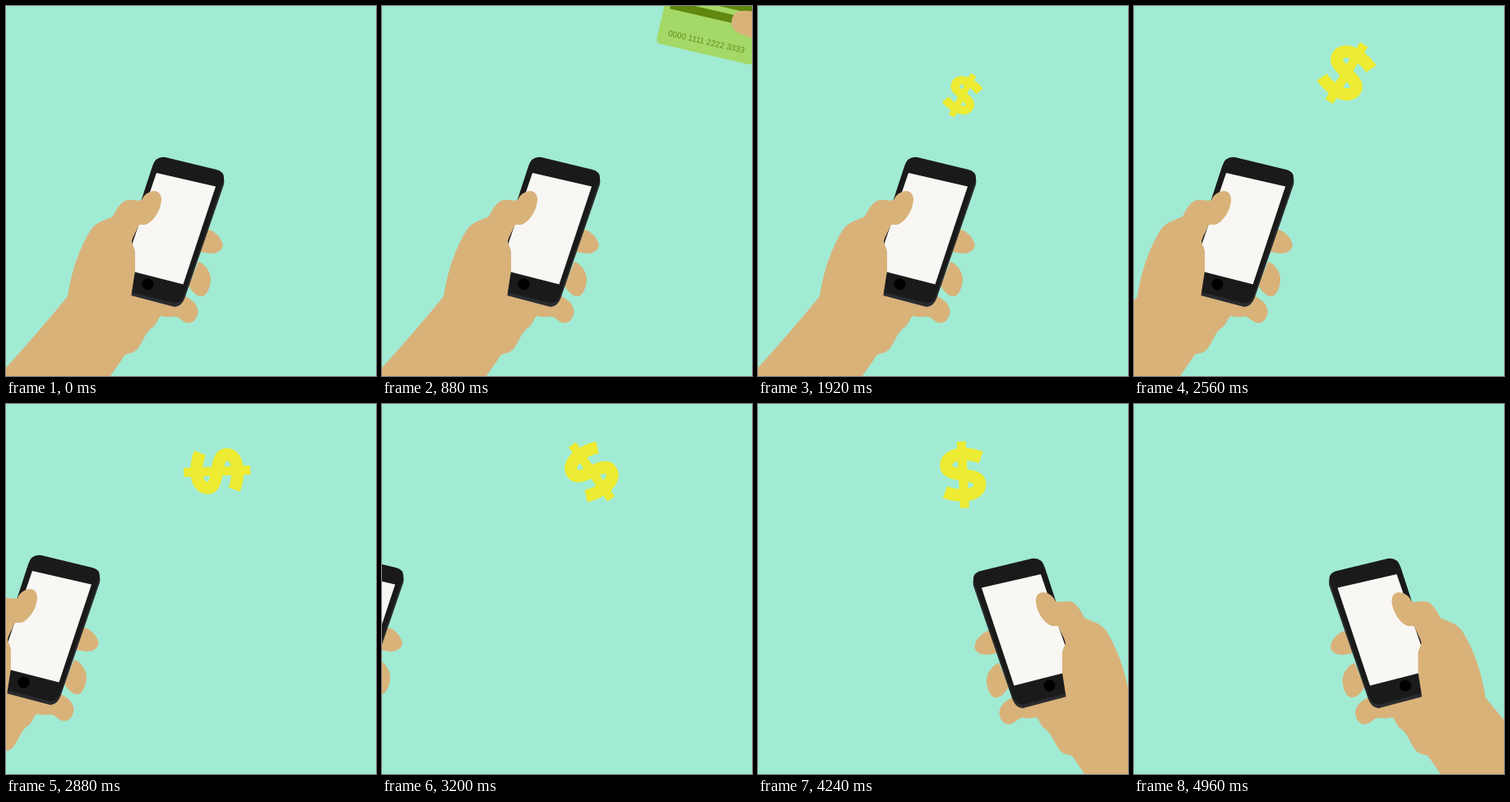
These frames come from a looping animation (450 by 450 pixels, 5360 ms). An HTML page:

```html
<!DOCTYPE html>
<html lang="en">
<head>
<meta charset="utf-8">
<title>Phone payment</title>
<style>
  html, body { margin: 0; width: 100%; height: 100%; overflow: hidden; background: #a1ebd4; }
  svg { display: block; width: 100%; height: 100%; }
  .skin { fill: #d9b27a; }
  .number { font: 10px "Liberation Sans", Arial, sans-serif; fill: #64891a; }
</style>
</head>
<body>
<svg viewBox="0 0 450 450">
  <defs>
    <g id="phoneHand">
      <!-- fingers and heel of the hand behind the phone -->
      <g class="skin">
        <path d="M243 271C252 272 262 281 263.500 290C264 298 256 301 248 301L236 299Z"/>
        <path d="M234 311C241 313 248 322 249 331C249 341 245 351 239 353C232 354 226 347 222 340Z"/>
        <path d="M215 352C224 355 233 362 233.500 371C233 380 228 386 221 385.500C214 384 211 378 205 377.500C199 379 193 378 188 377C184 381 183 388 178 391C168 398 167 409 160 417C155 423 149 422 145 424L127 450L120 462H90L120 320Z"/>
      </g>
      <path fill="#2a2b2f" d="M182 190L262 205Q266.500 209 265 217L217.500 355Q214 365 205 366L152 352L130 345Z"/>
      <path fill="#1a1a1a" d="M194 184L256 199Q267 202 264.500 212L217 351Q213 363 203 361L130 342L178 195Q182 182 194 184Z"/>
      <path fill="#f8f7f4" d="M183 203L255 219.500L215.500 338.500L143 320Z"/>
      <circle cx="172.500" cy="338.500" r="7"/>
      <path class="skin" d="M-12 454L0 440Q40 396 75 353C79 326 88 296 104 271C111 262 122 260 130 256C135 246 140 237 148 236C155 235 160 238 165 236C168 229 174 225 181 225C188 226 190 232 188.500 240C187 250 179 262 171 265.500C167 267 164 265 161 267C159 274 154 280 153 287C154 291 157 295 157 300L157 322L152.500 351V400L127 450L120 462H-12Z"/>
    </g>
  </defs>

  <rect width="450" height="450" fill="#a1ebd4"/>

  <g id="dollar" fill="none" stroke="#edeb32">
    <path stroke-width="15" d="M23 -20C16 -23 8 -25 0 -25C-12 -25 -20 -20 -20 -12C-20 -4 -10 -2 0 0C10 2 20 4 20 12C20 20 12 25 0 25C-8 25 -16 23 -23 20"/>
    <path stroke-width="11" d="M0 -40.500V40.500"/>
  </g>

  <use id="left" href="#phoneHand"/>
  <use id="right" href="#phoneHand"/>

  <g id="swiper">
    <path fill="#b0885b" d="M236 104C242 93 262 90 275 95C286 104 301 119 304 132C305 140 301 144 295 144L262 136Z"/>
    <path fill="#c39c69" d="M236 104C242 93 262 90 276 97C280 106 272 113 262 114L240 108Z"/>
    <g transform="translate(151 87) rotate(13)">
      <rect width="122" height="80" rx="6" fill="#a4d967"/>
      <path fill="#61870f" d="M7 9H114V19H7ZM7 25.500H114V35.500H7Z"/>
      <text class="number" x="12" y="68">0000 1111 2222 3333</text>
    </g>
    <path class="skin" d="M188 88C189 84 198 87 206 86C220 84 231 77 242 71C252 65 259 61 266 62C278 64 292 72 304 76C317 79 327 81 334 89L352 112L450 237L560 380V647L450 407C425 334 395 270 362 215C340 213 318 200 304 186C294 174 284 171 272 167C258 161 243 157 232 152C224 147 223 137 229 129C235 124 246 126 256 127C270 131 282 138 296 143C305 143 304 135 300 124C291 118 283 110 279 104C274 95 262 92 252 94C245 96 240 100 236 101.500C224 102 210 100 202 97C195 95 189 93 188 88Z"/>
  </g>
</svg>
<script>
  const LOOP = 5360, STEP = 80;
  const el = id => document.getElementById(id);
  const [dollar, left, right, swiper] = ["dollar", "left", "right", "swiper"].map(el);
  const clamp = v => Math.min(1, Math.max(0, v));
  const lerp = (a, b, p) => a + (b - a) * p;

  function place(node, visible, transform) {
    node.style.display = visible ? "" : "none";
    node.setAttribute("transform", transform);
  }

  // Sideways distance of a phone hand, for a time away from rest
  const drift = ms => 239 * Math.pow(Math.max(0, ms) / 1000, 1.19);

  function spin(t) {
    if (t < 2560) return 28 + (t - 1920) * 183.5 / 640;
    if (t < 3840) return 211.5 + (t - 2560) * 225.5 / 1280;
    return 437 + (t - 3840) / 4;
  }

  function drawDollar(t) {
    const rise = clamp((t - 1528) / 560);
    const fall = clamp((t - 4336) / 585);
    const sway = (t < 2560 ? 0 : t - 2560) / 1280;
    const hoverX = 258.5 - 7 * Math.min(sway, 1.35);
    const hoverY = 81.5 + 3.5 * Math.min(sway * sway, 1.3);
    const x = lerp(lerp(226, hoverX, rise), 288.8, fall);
    const y = lerp(lerp(172, hoverY, rise), 182.8, fall);
    const scale = rise * (1 - fall);
    place(dollar, t >= 1600 && fall < 1,
      `translate(${x} ${y}) rotate(${spin(t)}) scale(${scale})`);
  }

  function drawSwiper(t) {
    const before = Math.max(0, (1200 - t) / STEP);
    const after = Math.max(0, (t - 1520) / STEP);
    place(swiper, t >= 800 && t < 1920,
      `translate(${before * 50 + after * 64} ${after * 16 - before * 30})`);
  }

  function draw(time) {
    const t = Math.floor(time % LOOP / STEP) * STEP;
    place(left, t < 3440, `translate(${-drift(t - 2200)} 0)`);
    place(right, t >= 3280, `translate(${502.5 + drift(4387 - t)} 4) scale(-1 1)`);
    drawDollar(t);
    drawSwiper(t);
  }

  const start = performance.now();
  function tick() {
    draw(performance.now() - start);
    requestAnimationFrame(tick);
  }
  tick();
</script>
</body>
</html>
```
